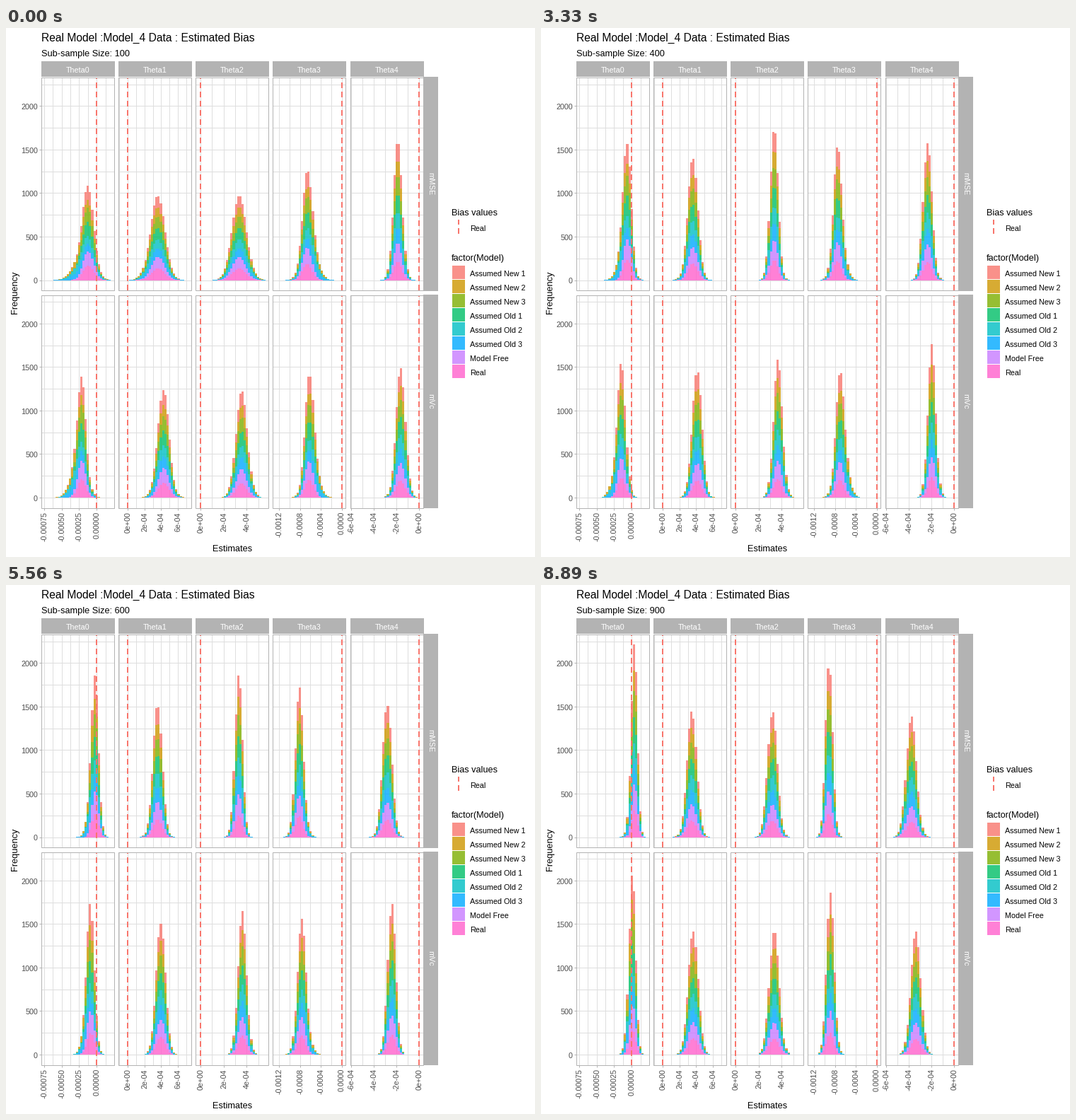
Write a matplotlib script that moves like this. It is 748 px wide and 748 px high and loops after 10 s.

```python
import numpy as np
import matplotlib.pyplot as plt
from matplotlib.animation import FuncAnimation
from matplotlib.patches import Polygon, Rectangle

SIDE, DPI = 748, 64
PX = 72 / DPI                      # points per pixel
BIN = 3.12                         # bar width in pixels
BARS = 30
PER_MODEL = 1000                   # estimates per model and panel
UNIT = 0.1231                      # pixels per count
WIDTH = 103                        # panel width
GREY, GRID, INK = "#B3B3B3", "#DEDEDE", "#4D4D4D"
RED = "#F8766D"

plt.rcParams["font.family"] = "Liberation Sans"

# name -> colour, in legend order; the last one is the bottom of each stack
MODELS = {
    "Assumed New 1": "#F8766D", "Assumed New 2": "#CD9600",
    "Assumed New 3": "#7CAE00", "Assumed Old 1": "#00BE67",
    "Assumed Old 2": "#00BFC4", "Assumed Old 3": "#00A9FF",
    "Model Free": "#C77CFF", "Real": "#FF61CC",
}
WIDE = {"Assumed New 2", "Assumed Old 2", "Assumed Old 3"}

# x of zero, tick step in pixels, step value, tick range, format, lean of the tail
COLUMNS = [
    (128.2, 24.7, 0.00025, range(-3, 1), ".5f", -0.9),
    (172.2, 23.6, 0.0002, range(0, 4), ".0e", -0.2),
    (275.2, 32.6, 0.0002, range(0, 3), ".0e", 0.1),
    (474.6, 29.5, 0.0004, range(-3, 1), ".4f", 0.6),
    (583.7, 31.8, 0.0002, range(-3, 1), ".0e", 0.0),
]
# top, bottom, baseline
ROWS = {"mMSE": (69.5, 371, 356.5), "mVc": (377.5, 678.5, 664)}

# per column: mode in bins from zero and peak count, at start, middle and end
PATHS = {
    "mMSE": [((-4, -1.5, 1.2), (1090, 1720, 2240)),
             ((13.6, 13.6, 13.2), (970, 1490, 1450)),
             ((17.5, 17.4, 16.7), (975, 1860, 1450)),
             ((-15.4, -18.4, -21.6), (1270, 1640, 2000)),
             ((-9.5, -13, -19.2), (1620, 1550, 1390))],
    "mVc": [((-6.9, -3.8, 0.3), (1390, 1640, 2100)),
            ((16.2, 15.3, 13.8), (1240, 1490, 1420)),
            ((18.6, 19.1, 17.5), (1230, 1640, 1430)),
            ((-14.5, -17.2, -21), (1430, 1500, 1860)),
            ((-8.2, -11, -17.2), (1490, 1770, 1420))],
}


def arc(points, t):
    """Parabola through three values at t = 0, 0.5 and 1."""
    a, b, c = points
    return a + t * (4 * b - 3 * a - c) + 2 * t * t * (a - 2 * b + c)


def bell(u, mean=0, sd=1):
    z = (u - mean) / sd
    return PER_MODEL * np.exp(-z * z / 2) / (sd * np.sqrt(2 * np.pi))


def counts(path, lean, t, bins):
    """Counts of every model (rows) in every bin at progress t."""
    mode, peak = (arc(points, t) for points in path)
    fade = 1 - 0.6 * t
    spread = 1 + (0.2 + 0.6 * abs(lean)) * fade

    def curves(u):
        return np.array([bell(u, lean * fade, spread) if name in WIDE else bell(u)
                         for name in MODELS])

    u = np.linspace(-2, 2, 401)
    total = curves(u).sum(axis=0)
    scale = total.max() / peak
    return np.round(curves((bins - mode) / scale + u[total.argmax()]) / scale)


fig = plt.figure(figsize=(SIDE / DPI, SIDE / DPI), dpi=DPI, facecolor="white")
ax = fig.add_axes([0, 0, 1, 1])
ax.set(xlim=(0, SIDE), ylim=(SIDE, 0))
ax.axis("off")


def text(x, y, s, size, color="black", **kw):
    kw.setdefault("va", "baseline")
    return ax.text(x, y, s, fontsize=size * PX, color=color, **kw)


def line(x, y, color, width=1, **kw):
    ax.plot(x, y, color=color, lw=width * PX, solid_capstyle="butt", **kw)


def box(x, y, w, h, **kw):
    ax.add_patch(Rectangle((x, y), w, h, **kw))


def dashed(x, bottom, top):
    line([x, x], [bottom, top], RED, 2, ls=(0, (3.5, 2.5)), dash_capstyle="butt",
         antialiased=False, zorder=4)


def left_edge(col):
    return int(50 + 109.25 * col) + 0.5


def panel(row, col):
    top, bottom, base = ROWS[row]
    zero, step, *_, lean = COLUMNS[col]
    left = left_edge(col)
    right = left + WIDTH
    for x in zero + np.arange(-8, 9) * step / 2:
        if left < x < right:
            line([x, x], [top, bottom], GRID, zorder=1)
    for n in range(0, 2251, 250):
        line([left, right], [base - n * UNIT] * 2, GRID, zorder=1)
    dashed(zero, bottom, top)
    box(left, top, WIDTH, bottom - top, fill=False, ec=GREY, lw=PX, zorder=5)

    bins = round((left + 4.7 - zero) / BIN + 0.5) + np.arange(BARS)
    edges = zero + (np.append(bins, bins[-1] + 1) - 0.5) * BIN
    polys = [ax.add_patch(Polygon([(left, base)] * 3, fc=color, alpha=0.8, lw=0,
                                  antialiased=False, zorder=3))
             for color in MODELS.values()]
    return PATHS[row][col], lean, bins, np.repeat(edges, 2)[1:-1], base, polys


panels = [panel(row, col) for row in ROWS for col in range(len(COLUMNS))]

# strips and axes
for col, (zero, step, value, ticks, fmt, _) in enumerate(COLUMNS):
    left = left_edge(col)
    box(left - 0.5, 47, WIDTH + 1, 22, fc=GREY, lw=0)
    text(left + WIDTH / 2, 63, f"Theta{col}", 10.8, "white", ha="center")
    for i in ticks:
        x = zero + i * step
        line([x, x], [679, 682], GREY)
        text(x + 0.5, 684, f"{i * value:{fmt}}", 10.8, INK, rotation=90,
             ha="center", va="top")
for name, (top, bottom, base) in ROWS.items():
    box(590.5, top - 0.5, 20.5, bottom - top + 1, fc=GREY, lw=0)
    text(600, (top + bottom) / 2, name, 10.8, "white", rotation=270,
         ha="center", va="center")
    for n in range(0, 2001, 500):
        y = base - n * UNIT
        line([47, 50], [y, y], GREY)
        text(45, y + 4.7, str(n), 10.8, INK, ha="right")

# titles
text(50, 19, "Real Model :Model_4 Data : Estimated Bias", 15.6)
subtitle = text(50, 39.5, "", 12.7)
text(320.5, 740, "Estimates", 12.8, ha="center")
text(13, 374, "Frequency", 12.8, rotation=90, ha="center", va="center")

# legends
text(630, 265, "Bias values", 12.7)
dashed(640, 291, 271)
text(656, 287, "Real", 10.8)
text(629.5, 329, "factor(Model)", 12.7)
for i, (name, color) in enumerate(MODELS.items()):
    y = 346 + 20 * i
    box(631, y - 10, 18, 19, fc=color, alpha=0.8, lw=0)
    text(656, y + 5, name, 10.8)


def draw(frame):
    stage = min(frame // 11, 8)    # nine stages with hard cuts
    subtitle.set_text(f"Sub-sample Size: {100 * (stage + 1)}")
    for path, lean, bins, xs, base, polys in panels:
        low = np.zeros(BARS)
        rows = counts(path, lean, stage / 8, bins)
        for poly, n in zip(polys[::-1], rows[::-1]):
            high = low + n
            ys = base - UNIT * np.append(np.repeat(high, 2), np.repeat(low, 2)[::-1])
            poly.set_xy(np.column_stack([np.append(xs, xs[::-1]), ys]))
            low = high
    return [subtitle]


anim = FuncAnimation(fig, draw, frames=100, init_func=lambda: draw(0),
                     interval=100, repeat=True, repeat_delay=0)
plt.show()
```
